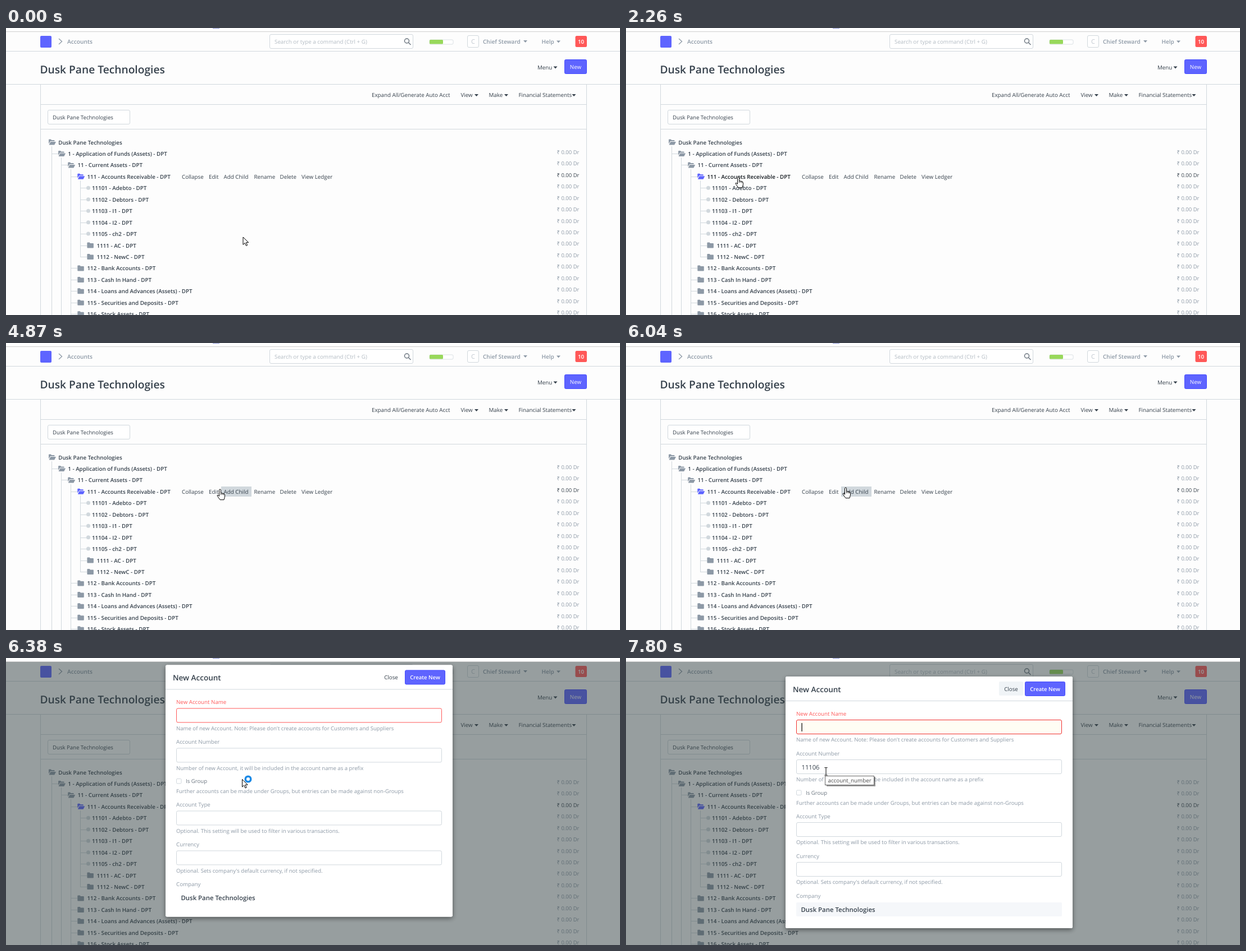
An HTML page for the animation above (8000 ms loop, 1093 by 512 pixels).

```html
<!DOCTYPE html>
<html lang="en">
<head>
<meta charset="utf-8">
<title>Chart of accounts</title>
<style>
  html, body { margin: 0; width: 100%; height: 100%; overflow: hidden; background: #fdfdfd; }
  svg { display: block; width: 1093px; height: 512px; }
  text { font-family: "Open Sans", "Noto Sans", sans-serif; text-rendering: geometricPrecision; white-space: pre; }
  #ghost { mix-blend-mode: multiply; }
</style>
</head>
<body>
<svg id="stage" viewBox="0 0 1093 512"></svg>
<script>
const LOOP = 8000;
const DARK = '#36414c', GREY = '#8d99a6', LINE = '#d1d8dd', BLUE = '#5e64ff', RED = '#ff5858';
const COMPANY = 'Dusk Pane Technologies';
const ROW_TOP = 203.5, ROW_STEP = 20.45;

// [indent level, kind, label]
const rows = [
  [0, 'open', COMPANY],
  [1, 'open', '1 - Application of Funds (Assets)'],
  [2, 'open', '11 - Current Assets'],
  [3, 'open', '111 - Accounts Receivable'],
  [4, 'leaf', '11101 - Adebto'],
  [4, 'leaf', '11102 - Debtors'],
  [4, 'leaf', '11103 - I1'],
  [4, 'leaf', '11104 - I2'],
  [4, 'leaf', '11105 - ch2'],
  [4, 'shut', '1111 - AC'],
  [4, 'shut', '1112 - NewC'],
  [3, 'shut', '112 - Bank Accounts'],
  [3, 'shut', '113 - Cash In Hand'],
  [3, 'shut', '114 - Loans and Advances (Assets)'],
  [3, 'shut', '115 - Securities and Deposits'],
  [3, 'shut', '116 - Stock Assets']
];

// Markup helpers; text is placed by the middle of its line.
const text = (x, y, label, { size = 9.8, fill = DARK, weight = 400, anchor = 'start', attrs = '' } = {}) =>
  `<text x="${x}" y="${y + size * 0.36}" font-size="${size}" fill="${fill}" font-weight="${weight}" text-anchor="${anchor}" ${attrs}>${label}</text>`;
const rect = (x, y, w, h, fill, attrs = '') =>
  `<rect x="${x}" y="${y}" width="${w}" height="${h}" fill="${fill}" ${attrs}/>`;
const box = (x, y, w, h, stroke = LINE, attrs = '') =>
  rect(x + 0.5, y + 0.5, w - 1, h - 1, '#fff', `rx="2.5" stroke="${stroke}" ${attrs}`);
const primary = (x, y, w, h) =>
  rect(x + 0.5, y + 0.5, w - 1, h - 1, BLUE, 'rx="2" stroke="#444bff"');
const path = (d, attrs) => `<path d="${d}" ${attrs}/>`;
const caret = (x, y, fill = DARK) => path(`M${x - 3.5} ${y - 2}h7l-3.5 4z`, `fill="${fill}"`);
const rowY = i => ROW_TOP + i * ROW_STEP;

function folder(x, y, open, fill) {
  const d = open
    ? `M${x} ${y + 3}v-7q0-1 1-1h3l1 1.5h4.5q1 0 1 1v1h-7.5zM${x + 0.5} ${y + 5}l2.8-5.5h9.7l-2.8 5.5z`
    : `M${x} ${y - 4}q0-1 1-1h3.5l1 1.5h5q1 0 1 1v6.5q0 1-1 1h-9.5q-1 0-1-1z`;
  return path(d, `fill="${fill}"`);
}

function header() {
  const dim = { fill: GREY, weight: 600, size: 10 };
  return rect(0, 0, 1093, 6, '#fff') + rect(368, 0, 12, 1, '#8c96d6') +
    rect(0, 6, 1093, 1, '#cfcfcf') + rect(0, 41, 1093, 1, LINE) + rect(0, 100, 1093, 1, LINE) +
    rect(61, 14, 20, 21, BLUE, 'rx="2"') +
    path('M94 19l5.5 5-5.5 5', `fill="none" stroke="${GREY}" stroke-width="1.3"`) +
    text(109, 24.5, 'Accounts', { ...dim, size: 10.2 }) +
    box(469, 11, 256, 26) +
    text(478, 24, 'Search or type a command (Ctrl + G)', { fill: '#b4bcc4' }) +
    path('M717.5 23a4 4 0 1 1-8 0a4 4 0 1 1 8 0M716.5 26l4 4', 'fill="none" stroke="#6c7680" stroke-width="1.5"') +
    rect(754, 21, 42, 8, '#fff', `rx="2" stroke="${LINE}" stroke-width=".8"`) +
    rect(754, 21, 24, 7.5, '#98d85b', 'rx="1.5"') +
    box(821, 13, 21, 22) + text(831.5, 24.5, 'C', { fill: '#c0c8cf', size: 11, anchor: 'middle' }) +
    text(849, 24.5, 'Chief Steward', dim) + caret(924.5, 24, GREY) +
    text(953.5, 24.5, 'Help', dim) + caret(983.5, 24.5, GREY) +
    rect(1013.5, 14, 20.5, 20, RED, 'rx="2.5"') +
    text(1023.5, 24, '10', { fill: '#fff', weight: 600, anchor: 'middle' }) +
    text(60.5, 74, COMPANY, { size: 19.2, weight: 600 }) +
    text(946, 70, 'Menu') + caret(978, 70.5) +
    primary(994, 56, 40, 26) +
    text(1014, 69.5, 'New', { fill: '#fff', anchor: 'middle' });
}

function toolbar() {
  return rect(61, 100, 1, 412, LINE) + rect(1033, 100, 1, 412, LINE) +
    rect(61, 136, 973, 1, LINE) + rect(61, 180, 973, 1, LINE) +
    text(651, 119.5, 'Expand All/Generate Auto Acct') +
    text(809.5, 119.5, 'View') + caret(837.5, 120) +
    text(859.5, 119.5, 'Make') + caret(890.5, 120) +
    text(912.5, 119.5, 'Financial Statements') + caret(1011, 120) +
    box(74, 146, 147, 26) + text(83, 159.5, COMPANY, { size: 9.6 });
}

function tree() {
  let out = [[81, 211, 512], [98, 231, 512], [115, 252, 512], [132, 272, 408]]
    .map(([x, top, end]) => rect(x, top, 1, end - top, LINE)).join('');
  rows.forEach(([level, kind, label], i) => {
    const y = rowY(i), x = 76 + 17.1 * level, leaf = kind === 'leaf';
    if (level) out += rect(Math.floor(x - 12), Math.round(y), 12, 1, LINE);
    out += leaf ? `<circle cx="146.5" cy="${y}" r="3.5" fill="${LINE}"/>`
      : folder(x, y, kind === 'open', i === 3 ? BLUE : GREY);
    out += text(leaf ? 153 : x + 17.2, y + 0.5, label + (level ? ' - DPT' : ''), { weight: 600, attrs: 'class="row"' });
    if (level) out += text(1020.5, y - 2.5, '₹ 0.00 Dr', { size: 9.5, anchor: 'end', fill: i === 3 ? DARK : GREY });
  });
  out += rect(383, 256, 54, 18, LINE, 'id="hover"');
  [[313, 'Collapse'], [361, 'Edit'], [387.5, 'Add Child'], [441.5, 'Rename'], [487.5, 'Delete'], [526, 'View Ledger']]
    .forEach(([x, label]) => { out += text(x, 265.5, label); });
  return out;
}

function form() {
  const label = (y, s, fill = GREY) => text(303, y, s, { fill, size: 9.75 });
  const help = (y, s) => text(303, y, s, { fill: GREY, size: 9.6 });
  const input = (y, attrs) => box(303, y, 473, 26, LINE, attrs);
  return rect(284, 76, 511, 1, LINE) +
    text(297, 56, 'New Account', { size: 13.5, weight: 600 }) +
    rect(664, 42, 43, 25, '#f0f4f7', 'rx="2" class="settled"') +
    text(685.5, 55.5, 'Close', { anchor: 'middle' }) +
    primary(710, 42, 72, 26) +
    text(746, 55.5, 'Create New', { fill: '#fff', weight: 600, size: 9.6, anchor: 'middle' }) +
    label(99, 'New Account Name', RED) + input(110, 'id="name"') +
    rect(312.5, 116, 1.2, 15, '#000', 'id="caret"') +
    help(146, "Name of new Account. Note: Please don't create accounts for Customers and Suppliers") +
    label(170, 'Account Number') + input(181) + text(312.5, 194.5, '11106', { size: 11.2, attrs: 'id="number"' }) +
    help(217, 'Number of new Account, it will be included in the account name as a prefix') +
    rect(303.5, 236, 8.5, 8.5, '#fff', `rx="1.5" stroke="${LINE}"`) +
    text(320, 240.5, 'Is Group', { size: 9.6, fill: '#6c7680' }) +
    help(258.5, 'Further accounts can be made under Groups, but entries can be made against non-Groups') +
    label(282.5, 'Account Type') + input(293) +
    help(329, 'Optional. This setting will be used to filter in various transactions.') +
    label(353, 'Currency') + input(364) +
    help(400, "Optional. Sets company's default currency, if not specified.") +
    label(424.5, 'Company') +
    rect(303, 436, 473, 25, '#f5f7fa', 'rx="2" class="settled"') +
    text(311.5, 448.5, COMPANY, { size: 11.4, weight: 600 });
}

function pointers() {
  const ink = 'fill="#fff" stroke="#000" stroke-width="1" stroke-linejoin="round"';
  const arrow = path('M.5.5v13.5l3.2-3 2.3 5 2.2-1-2.3-4.8h4.3z', ink);
  return `<g id="pointer">
    <g data-kind="arrow">${arrow}</g>
    <g data-kind="hand">${path('M-1.5 1.5a1.5 1.5 0 0 1 3 0v5l5 1.2q2 .5 2 2.5v3l-1.5 5.5h-7l-4.6-6.5q-1-2 .8-2l2.3 2z', ink)}
      ${path('M1.5 6.5v3.5M4 7.5v2.5M6.3 8v2.5', 'stroke="#000" stroke-width=".8"')}</g>
    <g data-kind="busy">${arrow}<circle cx="11" cy="0" r="4.8" fill="#fff" stroke="#1c8ae6" stroke-width="3.5"/></g>
    <g data-kind="beam">${path('M-2.5-6.5h2l.5.5.5-.5h2M0-6v12.5M-2.5 7h2l.5-.5.5.5h2', 'fill="none" stroke="#000"')}</g>
  </g>`;
}

// While the dialog fades in, the page's ink still shows through its white panel (#ghost).
const stage = document.getElementById('stage');
stage.innerHTML = `<defs>
    <filter id="shadow" x="-5%" y="-5%" width="110%" height="112%"><feDropShadow dx="0" dy="3" stdDeviation="4" flood-opacity=".45"/></filter>
    <clipPath id="below-strip"><rect y="7" width="1093" height="505"/></clipPath>
    <clipPath id="panel">${rect(284, 33, 511, 449, '#fff', 'class="sliding"')}</clipPath>
  </defs>
  <g id="page">${header() + toolbar() + tree()}</g>
  <g clip-path="url(#below-strip)">
    ${rect(0, 7, 1093, 505, '#334143', 'id="backdrop"')}
    <g id="dialog">
      <g class="sliding">
        ${rect(284, 33, 511, 449, '#fff', 'rx="3" filter="url(#shadow)" class="fading"')}
        ${rect(284, 33, 511, 449, '#fff', 'rx="3" opacity=".97"')}
        <g class="fading">${form()}</g>
      </g>
      <g id="ghost" clip-path="url(#panel)"><use href="#page"/></g>
    </g>
  </g>
  <g id="tip">${rect(357, 212, 87, 17, '#000', 'opacity=".4"')}${rect(354.5, 210.5, 87, 16, '#fff', 'stroke="#666"')}
    ${text(359.5, 218.5, 'account_number', { fill: '#4a4a4a' })}</g>` + pointers();

const get = id => document.getElementById(id);
const all = selector => [...document.querySelectorAll(selector)];
const show = (node, on) => node.setAttribute('visibility', on ? 'inherit' : 'hidden');
const clamp = v => Math.max(0, Math.min(1, v));
const labels = all('#page .row'), settled = all('.settled'), sliding = all('.sliding'),
  fading = all('.fading'), kinds = all('#pointer > g');

// Pointer stops: [ms, x, y]
const stops = [
  [0, 421.5, 372.5], [30, 421.5, 372.5], [250, 456, 360], [780, 270, 240], [880, 270, 240],
  [1060, 150, 214], [1150, 92, 220], [1290, 132, 227], [1660, 215, 272], [1690, 215, 272],
  [1990, 200, 266], [2240, 200, 266], [3040, 186, 324], [3070, 186, 324], [3200, 183, 338],
  [3400, 195, 366], [3600, 178, 290], [3850, 185, 366], [3880, 185, 366], [4410, 426, 269],
  [4560, 426, 269], [4680, 425, 264], [4869, 425, 264], [4870, 381, 261], [4980, 335, 258],
  [5180, 335, 258], [5330, 391, 258], [6240, 391, 258], [6260, 391, 258], [6380, 420, 216],
  [6600, 427, 220], [6800, 427, 220], [7580, 357, 200], [7800, 356, 202], [LOOP, 356, 202]
];

function pointerAt(t) {
  const i = stops.findIndex(s => s[0] > t);
  const [t0, x0, y0] = stops[i - 1], [t1, x1, y1] = stops[i];
  const u = (t - t0) / (t1 - t0), e = u * u * (3 - 2 * u);
  return [x0 + (x1 - x0) * e, y0 + (y1 - y0) * e];
}

function hoveredRow(x, y) {
  const i = Math.floor((y - ROW_TOP + 8) / ROW_STEP), node = labels[i];
  if (!node) return -1;
  const left = +node.getAttribute('x');
  return x >= left && x <= left + node.getComputedTextLength() ? i : -1;
}

function pointerKind(t, x, y, row) {
  if (t >= 6230) {
    if (t < 6800) return 'busy';
    return x > 303 && x < 776 && y > 181 && y < 207 ? 'beam' : 'arrow';
  }
  const onLink = x > 308 && x < 586 && y > 255 && y < 275;
  return row >= 0 || onLink ? 'hand' : 'arrow';
}

function drawDialog(t) {
  const open = t >= 6230, focused = t >= 6820;
  const fade = clamp((t - 6215) / 150), rest = 1 - clamp((t - 6180) / 343);
  show(get('backdrop'), open);
  show(get('dialog'), open);
  show(get('ghost'), open && fade < 1);
  get('backdrop').setAttribute('opacity', 0.5 * fade);
  get('ghost').setAttribute('opacity', clamp(1.1 * (1 - fade)));
  fading.forEach(node => node.setAttribute('opacity', fade));
  sliding.forEach(node => node.setAttribute('transform', `translate(0 ${-120 * rest * rest})`));
  settled.forEach(node => show(node, t >= 6500));

  get('name').setAttribute('stroke', focused ? '#f03030' : RED);
  get('name').setAttribute('fill', focused ? '#fffdf4' : '#fff');
  show(get('number'), focused);
  show(get('caret'), focused && (t - 6800) % 1000 < 500);
  show(get('tip'), t >= 7700);
}

function draw(t) {
  const [x, y] = pointerAt(t);
  const row = t >= 6230 ? -1 : hoveredRow(x, y);
  const kind = pointerKind(t, x, y, row);
  labels.forEach((node, i) => node.setAttribute('fill', i === row ? '#12181e' : DARK));
  get('pointer').setAttribute('transform', `translate(${x} ${y})`);
  kinds.forEach(node => show(node, node.dataset.kind === kind));
  show(get('hover'), t >= 4870);
  get('hover').setAttribute('fill', t >= 5790 && t < 6040 ? '#c3ccd3' : LINE);
  drawDialog(t);
}

function tick() {
  draw(performance.now() % LOOP);
  requestAnimationFrame(tick);
}
tick();
</script>
</body>
</html>
```
